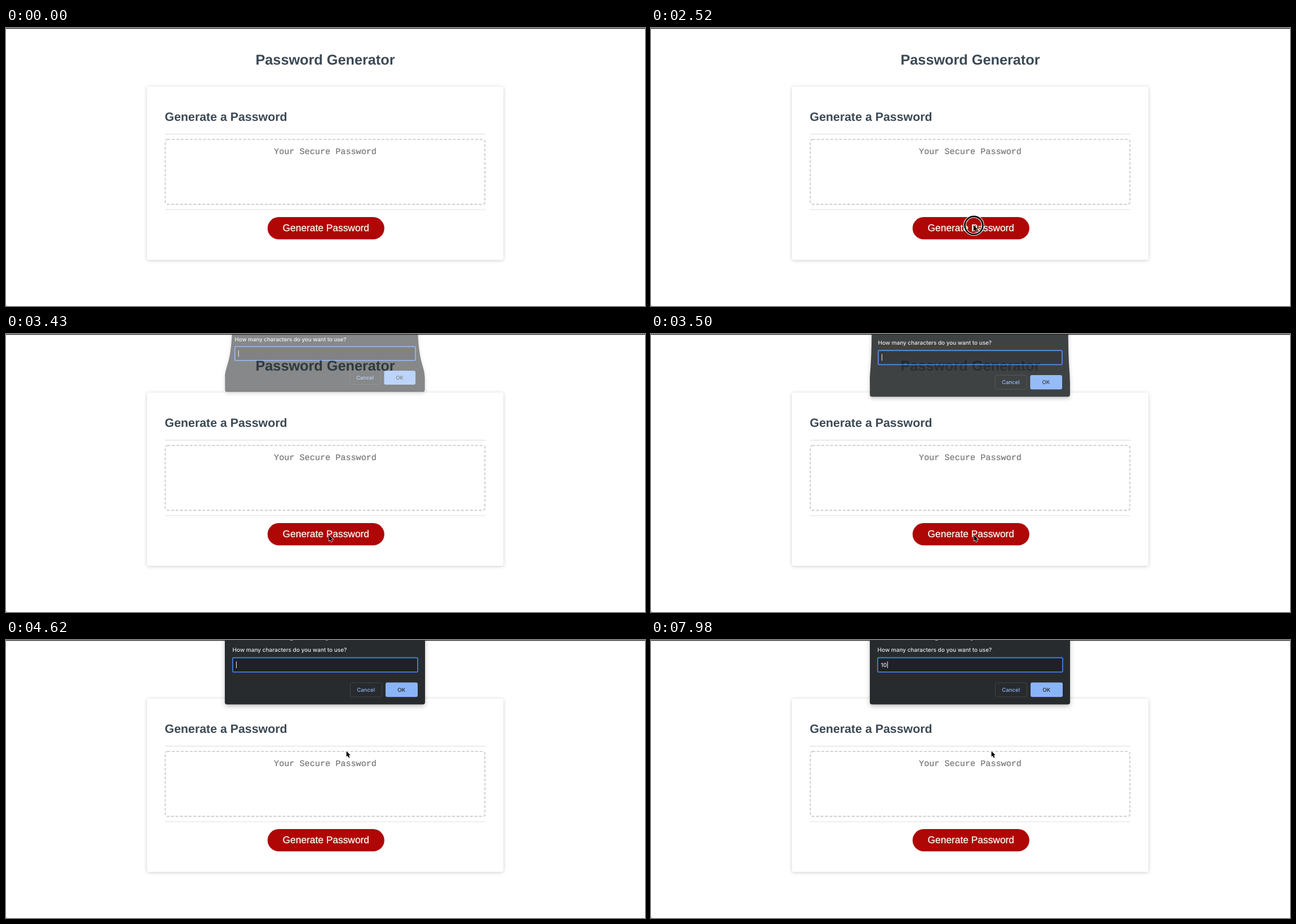
Recreate the animation shown at these times as an HTML page. Size 1133 px wide and 494 px high, loop 8000 ms.

```html
<!DOCTYPE html>
<html lang="en">
<head>
<meta charset="utf-8">
<title>Password Generator</title>
<style>
  html, body { margin: 0; width: 100%; height: 100%; overflow: hidden; background: #fff; }
  svg { display: block; width: 1133px; height: 494px; }
  text { white-space: pre; text-rendering: geometricPrecision; }
  .head { font-family: "Liberation Sans", Arial, sans-serif; font-weight: 700; fill: #3b4954; }
  .mono { font: 15.17px "Liberation Mono", "Courier New", monospace; fill: #757575; stroke: #757575; stroke-width: .2; }
  .btn { font: 17.38px "Liberation Sans", Arial, sans-serif; fill: #fff; stroke: #fff; stroke-width: .25; }
  .ui { font-family: Inter, sans-serif; font-weight: 500; }
  .mid { text-anchor: middle; }
  .card { fill: #fff; filter: drop-shadow(0 1.6px 3.2px rgba(0,0,0,.2)); }
  .pill { fill: #af0606; filter: drop-shadow(0 .8px 1px rgba(0,0,0,.08)); }
  .sheet { fill: #282b2d; filter: drop-shadow(0 3px 4px rgba(0,0,0,.25)); }
</style>
</head>
<body>
<svg viewBox="0 0 1133 494" xmlns="http://www.w3.org/2000/svg">
  <rect width="1133" height="1.4" fill="#363638"/>
  <rect y="493" width="1.5" height="1" fill="#777"/>

  <text class="head mid" x="566" y="65.4" font-size="25.28">Password Generator</text>
  <rect class="card" x="250" y="104" width="632" height="308" rx="4"/>
  <text class="head" x="281.6" y="165" font-size="21.33">Generate a Password</text>
  <path d="M282 188.6H850M282 322.8H850" stroke="#e0e0e0" stroke-width="1.1"/>
  <rect x="282.4" y="198" width="566.8" height="115.4" rx="4" fill="none"
        stroke="#c4c4c4" stroke-width="1.6" stroke-dasharray="4.75 3.16"/>
  <text class="mono mid" x="566" y="224">Your Secure Password</text>
  <rect class="pill" x="463.8" y="336.1" width="207" height="39.5" rx="19.75"/>
  <text class="btn mid" x="567.3" y="361.3">Generate Password</text>

  <g id="dialog">
    <path id="sheet" class="sheet"/>
    <path d="M504 .4h4.5M567 .4h3" stroke="#c9cacd" stroke-width=".9"/>
    <text class="ui" x="401.6" y="21.3" font-size="10" fill="#e8eaed">How many characters do you want to use?</text>
    <rect x="401.9" y="31.5" width="328" height="25.4" rx="1.5" fill="#202124" stroke="#3f7fe0" stroke-width="1.8"/>
    <text id="typed" class="ui" x="407.6" y="47.6" font-size="10" fill="#e8eaed"></text>
    <rect id="caret" y="38" width="1" height="12" fill="#e8eaed"/>
    <rect x="610.5" y="76" width="56" height="25" rx="3" fill="none" stroke="#414447"/>
    <text class="ui mid" x="638.2" y="91.6" font-size="9.6" fill="#8ab4f8">Cancel</text>
    <rect x="673" y="75.6" width="57" height="25.6" rx="3" fill="#8ab4f8"/>
    <text class="ui mid" x="701.2" y="91.6" font-size="9.6" fill="#202124">OK</text>
  </g>

  <g id="ring" fill="none">
    <circle cx="572.4" cy="350.8" r="16" stroke="#fff" stroke-width="4.8"/>
    <circle cx="572.4" cy="350.8" r="16" stroke="#000" stroke-width="2.7"/>
  </g>
  <path id="pointer" d="M0 0V10L2.3 7.9 4.1 11.9 5.8 11.1 4.1 7.2H7.2Z"
        stroke="#fff" stroke-width="1.3" paint-order="stroke"/>
</svg>

<script>
const LOOP = 8000, STEP = 70;
const ENTER = 210, OPEN = 3430, OPEN_TIME = 210;
const BLINK = 1050, BLINK_ON = 560;

const el = id => document.getElementById(id);
const show = (id, on) => el(id).setAttribute("visibility", on ? "visible" : "hidden");
const clamp = v => Math.min(1, Math.max(0, v));
const smooth = p => p * p * (3 - 2 * p);

// Each move eases to a point and may bow sideways on the way
const origin = { x: 568, y: 486 };
const moves = [
  { from: 210, to: 490, x: 578, y: 427, bow: 0 },
  { from: 700, to: 1190, x: 548.4, y: 294, bow: 20 },
  { from: 1400, to: 2240, x: 572, y: 350.5, bow: 10 },
  { from: 2870, to: 3080, x: 572.6, y: 357.5, bow: 0 },
  { from: 3500, to: 4060, x: 603.6, y: 197.5, bow: 4 }
];

function pointerAt(t) {
  let { x, y } = origin;
  for (const m of moves) {
    const p = smooth(clamp((t - m.from) / (m.to - m.from)));
    x += (m.x - x) * p + m.bow * Math.sin(Math.PI * p);
    y += (m.y - y) * p;
  }
  return [x, y];
}

// k runs from 1 (hidden) to 0 (open); the sheet bends while it drops in
function drawDialog(k) {
  const top = 20 * k, low = -9 * k;
  el("sheet").setAttribute("d",
    `M${388 + top} -12H${743 - top}C${743 - top} 62 ${743 - low} 66 ${743 - low} 88` +
    `v22.5q0 4 -4 4H${392 + low}q-4 0 -4 -4V88C${388 + low} 66 ${388 + top} 62 ${388 + top} -12Z`);
  el("dialog").setAttribute("opacity", 1 - k);
  el("dialog").setAttribute("transform",
    `translate(565.5 ${-18 * k}) scale(${1 - .054 * k} ${1 - .072 * k}) translate(-565.5 0)`);
}

function draw(time) {
  const t = Math.floor(time / STEP) * STEP;

  show("pointer", t >= ENTER);
  el("pointer").setAttribute("transform", `translate(${pointerAt(t)})`);
  show("ring", t >= 2520 && t < 2660);

  const open = t >= OPEN;
  el("dialog").style.display = open ? "" : "none";
  if (!open) return;
  drawDialog((1 - clamp((t - OPEN + STEP) / OPEN_TIME)) ** 2);

  const typed = "10".slice(0, (t >= 7770) + (t >= 7980));
  el("typed").textContent = typed;
  el("caret").setAttribute("x", 408 + 5.5 * typed.length);
  const blink = t - OPEN - 2 * STEP;
  show("caret", blink < 0 || blink % BLINK < BLINK_ON);
}

const start = performance.now();
function tick() {
  draw((performance.now() - start) % LOOP);
  requestAnimationFrame(tick);
}
tick();
</script>
</body>
</html>
```
